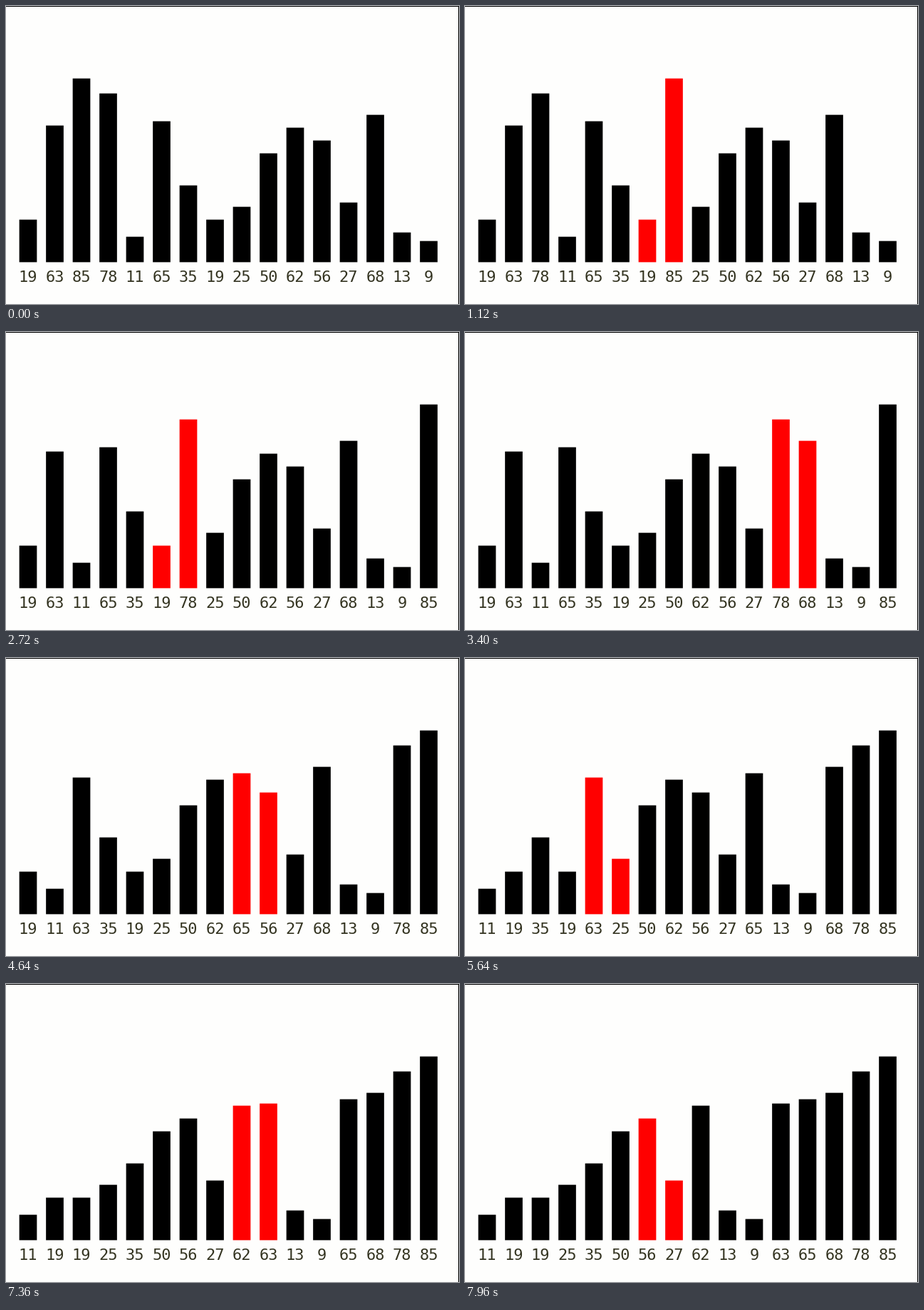
Animation, 636 px wide and 418 px high, one loop 8000 ms. Source, as a matplotlib script:

```python
import numpy as np
import matplotlib.pyplot as plt
from matplotlib.animation import FuncAnimation
from matplotlib.patches import Rectangle

W, H, DPI = 636, 418, 100
TICK, FRAMES = 40, 200
BASE, BAR_W, PITCH, LEFT = 359, 24, 37.5, 19
SOFT = 0.35  # bars bleed this far past the pixel grid, for soft edges
PAPER, INK, HOT, LABEL = "#fefefd", "#000000", "#ff0000", "#333320"
VALUES = [19, 63, 85, 78, 11, 65, 35, 19, 25, 50, 62, 56, 27, 68, 13, 9]

# Pace of the sort: frame number -> step number
PACE_FRAME = [12, 51, 85, 87, 116, 141, 168, 169, 199]
PACE_STEP = [0, 36, 70, 70, 99, 122, 146, 146, 173]


def bubble_steps(values):
    """List of (values, highlighted pair) for every visible step."""
    a, steps = list(values), []
    for end in range(len(a) - 1, 0, -1):
        for i in range(end):
            steps.append((a[:], (i, i + 1)))
            if a[i] > a[i + 1]:
                a[i], a[i + 1] = a[i + 1], a[i]
                steps.append((a[:], (i, i + 1)))
                steps.append((a[:], ()))
    return steps


STEPS = bubble_steps(VALUES)

fig = plt.figure(figsize=(W / DPI, H / DPI), dpi=DPI, facecolor=PAPER)
ax = fig.add_axes([0, 0, 1, 1])
ax.set_xlim(0, W)
ax.set_ylim(H, 0)
ax.axis("off")

ax.add_patch(Rectangle((0, 0), W, 1, fc=INK, lw=0))
ax.add_patch(Rectangle((W - 1, 0), 1, H, fc=INK, lw=0))

bars, labels = [], []
for k in range(len(VALUES)):
    x = LEFT + PITCH * k
    bars.append(ax.add_patch(Rectangle((x - SOFT, BASE), BAR_W + 2 * SOFT, 0,
                                       lw=0, snap=False)))
    labels.append(ax.text(x + BAR_W / 2, 387, "", ha="center", va="baseline",
                          family="DejaVu Sans Mono", color=LABEL,
                          fontsize=22 * 72 / DPI))


def state(frame):
    if frame < PACE_FRAME[0]:
        return VALUES, ()
    step = np.interp(frame, PACE_FRAME, PACE_STEP)
    return STEPS[int(round(float(step)))]


def update(frame):
    values, pair = state(frame)
    for k, (bar, label, v) in enumerate(zip(bars, labels, values)):
        height = 3 * v + 2
        bar.set_y(BASE - height - SOFT)
        bar.set_height(height + 2 * SOFT)
        bar.set_facecolor(HOT if k in pair else INK)
        label.set_text(str(v))
    return bars + labels


anim = FuncAnimation(fig, update, frames=FRAMES, interval=TICK,
                     init_func=lambda: update(0), repeat=True,
                     repeat_delay=0, blit=False)
plt.show()
```
